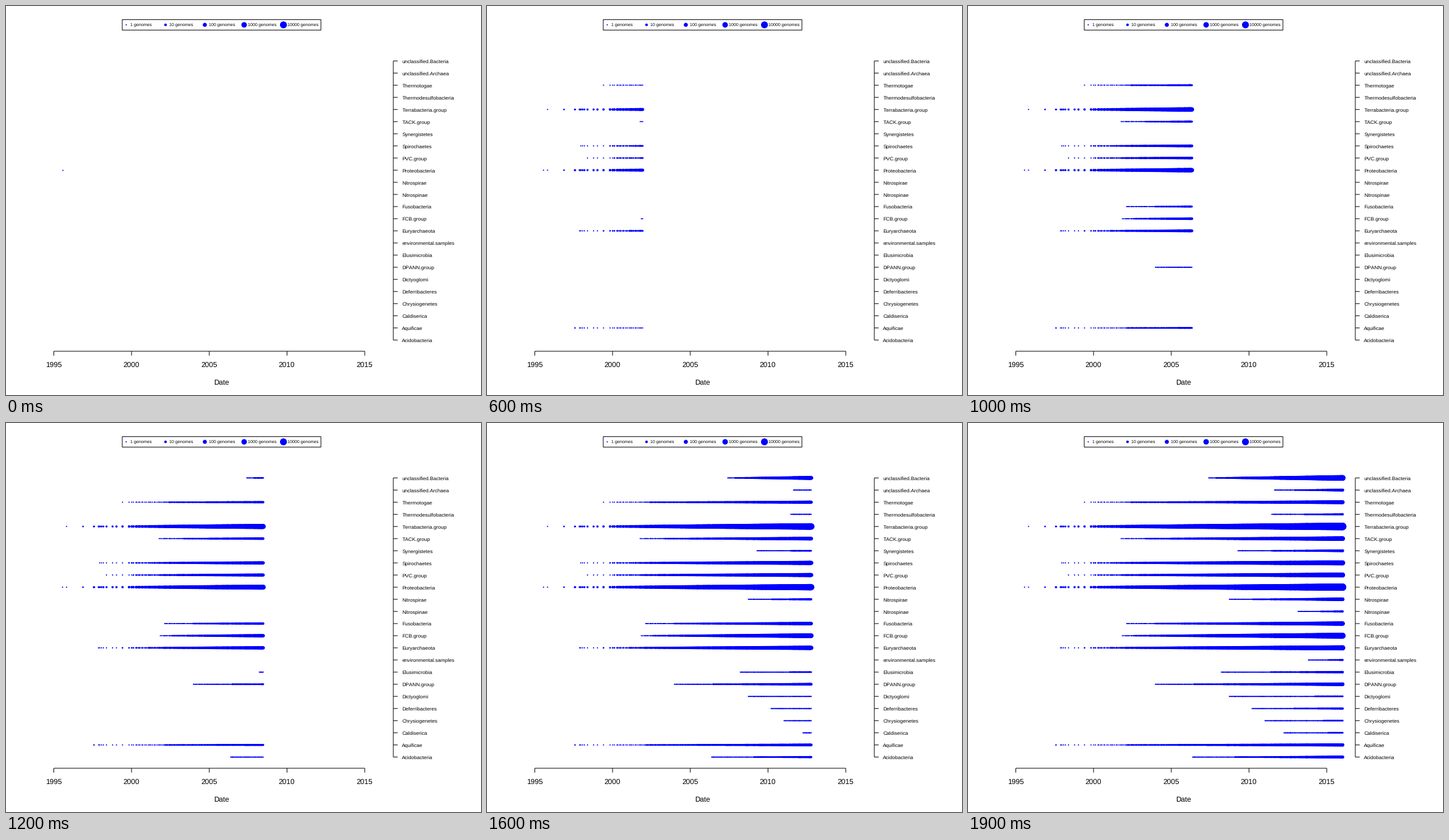
A matplotlib script for the animation above (3 s loop, 780 by 640 pixels).

```python
import numpy as np
import matplotlib.pyplot as plt
from matplotlib.animation import FuncAnimation

W, H, DPI = 780, 640, 100
PT = 72 / DPI                      # points per pixel
BLUE = "#0000ff"
FRAMES, STEPS = 30, 20
FIRST, LAST = 1995.56, 2016.02     # dates of the first and last dots

plt.rcParams["font.family"] = "Liberation Sans"
plt.rcParams["text.hinting"] = "none"
plt.rcParams["text.kerning_factor"] = 6   # no visible kerning

# Group, date of its first genome, genomes at the end.
GROUPS = [
    ("unclassified.Bacteria", 2007.40, 1450),
    ("unclassified.Archaea", 2011.63, 16),
    ("Thermotogae", 1999.41, 76),
    ("Thermodesulfobacteria", 2011.43, 5),
    ("Terrabacteria.group", 1995.82, 28000),
    ("TACK.group", 2001.76, 250),
    ("Synergistetes", 2009.28, 13),
    ("Spirochaetes", 1997.96, 450),
    ("PVC.group", 1998.39, 370),
    ("Proteobacteria", 1995.56, 19000),
    ("Nitrospirae", 2008.73, 50),
    ("Nitrospinae", 2013.12, 4),
    ("Fusobacteria", 2002.11, 170),
    ("FCB.group", 2001.84, 1800),
    ("Euryarchaeota", 1997.88, 540),
    ("environmental.samples", 2013.78, 3),
    ("Elusimicrobia", 2008.22, 7),
    ("DPANN.group", 2003.95, 50),
    ("Dictyoglomi", 2008.73, 2),
    ("Deferribacteres", 2010.18, 5),
    ("Chrysiogenetes", 2011.00, 2),
    ("Caldiserica", 2012.25, 2),
    ("Aquificae", 1997.57, 28),
    ("Acidobacteria", 2006.34, 19),
]

EARLY_DATES = [FIRST, 1995.82, 1996.88, 1997.57, 1997.60, 1997.88, 1997.96,
               1998.07, 1998.19, 1998.39, 1998.78, 1999.03, 1999.42, 1999.84]


def year_x(year):
    return 78.5 + 25.53 * (year - 1995)


def row_y(i):
    return 90.37 + 459.26 * i / (len(GROUPS) - 1)


def radius(count):
    return 1 + 1.17 * np.log10(count)


def area(count):
    """Scatter size of a dot standing for a number of genomes."""
    return (2 * radius(count) * PT) ** 2


def release_dates():
    """A few early dates, then releases at ever shorter random gaps."""
    rng = np.random.default_rng(4)
    dates = list(EARLY_DATES)
    while dates[-1] < LAST:
        gap = np.interp(dates[-1], [2000, 2002, 2005.5], [0.11, 0.06, 0.04])
        dates.append(dates[-1] + gap * rng.uniform(0.4, 1.6))
    dates[-1] = LAST
    return np.array(dates)


def genome_counts(dates, start, final):
    """Exponential growth; small groups pick up later."""
    power = np.log10(final)
    pace = max(1, 2 - power / 3)
    progress = (dates - start) / (LAST - start)
    return np.round(10 ** (power * progress ** pace))


def build_dots():
    dates = release_dates()
    parts = []
    for i, (_, start, final) in enumerate(GROUPS):
        own = dates[dates >= start]
        counts = genome_counts(own, start, final)
        parts.append(np.column_stack([own, np.full(len(own), row_y(i)), counts]))
    dots = np.vstack(parts)
    return dots[np.argsort(dots[:, 0], kind="stable")]


fig = plt.figure(figsize=(W / DPI, H / DPI), dpi=DPI, facecolor="white")
ax = fig.add_axes([0, 0, 1, 1])
ax.set(xlim=(0, W), ylim=(H, 0))
ax.axis("off")


def line(xs, ys):
    ax.plot(xs, ys, color="black", lw=PT, solid_capstyle="butt",
            solid_joinstyle="miter", snap=False)


def label(x, y, text, size, ha="left"):
    ax.text(x, y, text, fontsize=size * PT, ha=ha, va="baseline")


def draw_legend():
    left, right, top, bottom = 190.9, 517.1, 22.4, 39.7
    line([left, right, right, left, left], [top, top, bottom, bottom, top])
    counts = 10 ** np.arange(5)
    xs = 197.4 + 64.55 * np.arange(5)
    ax.scatter(xs, np.full(5, 31), s=area(counts), c=BLUE, linewidths=0)
    for x, count in zip(xs, counts):
        label(x + 6.4, 34, f"{count} genomes", 7.2)


def draw_axes():
    line([year_x(1995), year_x(2015)], [568, 568])
    for year in range(1995, 2016, 5):
        x = year_x(year)
        line([x, x], [568, 575.2])
        label(x - 0.3, 594, str(year), 12, "center")
    label(353.6, 623, "Date", 12, "center")

    line([636, 636], [row_y(0), row_y(len(GROUPS) - 1)])
    for i, (name, *_) in enumerate(GROUPS):
        y = row_y(i)
        line([636, 643.2], [y, y])
        label(650.4, round(y + 3.5), name, 8.4)


draw_legend()
draw_axes()
dots = build_dots()
cloud = ax.scatter([], [], c=BLUE, linewidths=0, zorder=3)


def update(frame):
    step = min(frame, STEPS - 1)
    cutoff = FIRST + (LAST - FIRST) * step / (STEPS - 1) + 1e-6
    dates, ys, counts = dots[dots[:, 0] <= cutoff].T
    cloud.set_offsets(np.column_stack([year_x(dates), ys]))
    cloud.set_sizes(area(counts))
    return (cloud,)


anim = FuncAnimation(fig, update, frames=FRAMES, interval=100,
                     init_func=lambda: update(0), repeat=True, repeat_delay=0)
plt.show()
```
